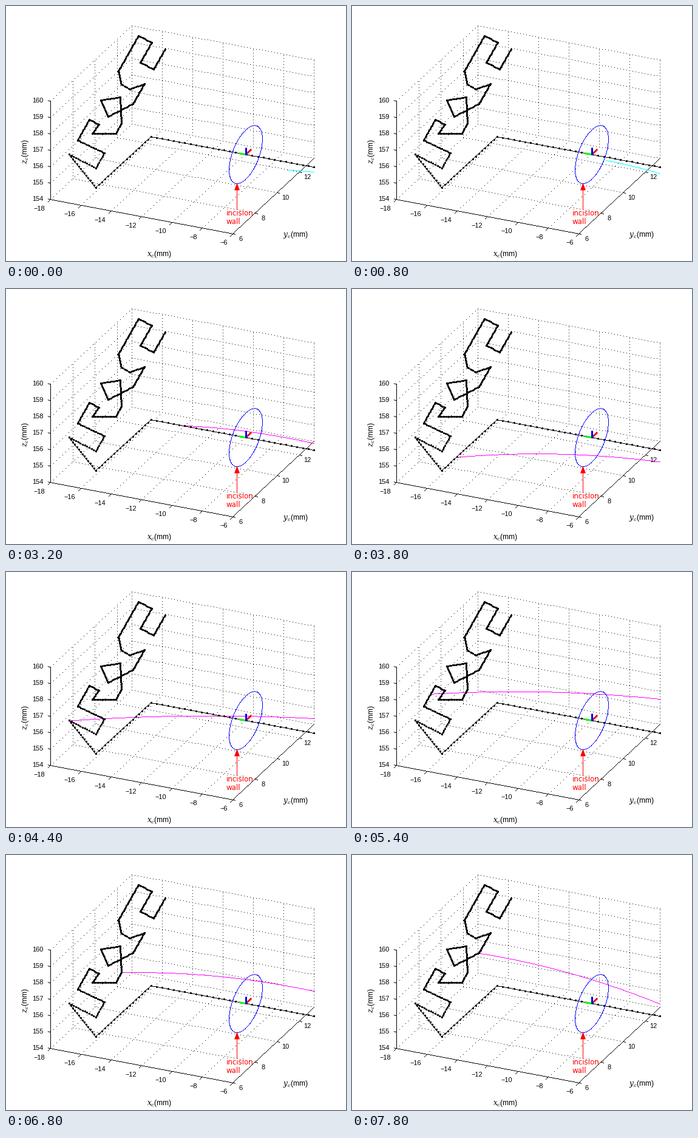
Animation of 560x420 px, one loop 8000 ms. Source, as a matplotlib script:

```python
import numpy as np
import matplotlib.pyplot as plt
from matplotlib.animation import FuncAnimation
from matplotlib.collections import LineCollection

plt.rcParams["font.family"] = "Liberation Sans"
plt.rcParams["mathtext.fontset"] = "dejavuserif"

DPI, W, H = 100, 560, 420
PX = 72 / DPI
STEP, FRAMES = 200, 40

# Orthographic view: screen vectors for one unit along each axis
EX = np.array([25, 4.7])
EY = np.array([18.27, -16.95])
EZ = np.array([0, -27])
ORIGIN = np.array([73, 318.3])
X0, X1, Y0, Y1, Z0, Z1 = -18, -6, 6, 13.334, 154, 160


def project(x, y, z):
    return ORIGIN + (x - X0) * EX + (y - Y0) * EY + (z - Z0) * EZ


fig = plt.figure(figsize=(W / DPI, H / DPI), dpi=DPI, facecolor="white")
ax = fig.add_axes([0, 0, 1, 1])
ax.set_xlim(-0.5, W - 0.5)
ax.set_ylim(H - 0.5, -0.5)
ax.axis("off")


def raster(pts, every=1):
    """One-pixel dashes along a polyline, without smoothing."""
    dots = []
    for a, b in zip(pts[:-1], pts[1:]):
        n = max(1, int(np.ceil(np.abs(b - a).max())))
        k = np.arange(0, n + 1, every)[:, None] / n
        dots.append(np.rint(a + (b - a) * k))
    dots = np.unique(np.vstack(dots), axis=0)
    half = np.array([0.5, 0])
    return np.stack([dots - half, dots + half], axis=1)


def line(pts, color="black", zorder=2, every=1):
    segs = raster(np.asarray(pts, dtype=float), every)
    art = LineCollection(segs, colors=color, linewidths=PX,
                         zorder=zorder, snap=False)
    return ax.add_collection(art, autolim=False)


def label(x, y, text, size=11, **kw):
    kw = {"ha": "center", "va": "center", **kw}
    ax.text(x, y, text, fontsize=size * PX, **kw)


def grid(*corners):
    line([project(*c) for c in corners], zorder=1, every=5)


def draw_axes():
    for x in range(X0, X1 + 1, 2):
        grid((x, Y0, Z0), (x, Y1, Z0), (x, Y1, Z1))
        tick = project(x, Y0, Z0)
        line([tick, tick + (-4, 4)])
        label(tick[0] - 9, tick[1] + 15, f"\u2212{-x}", ha="right")
    for y in (6, 8, 10, 12):
        grid((X1, y, Z0), (X0, y, Z0), (X0, y, Z1))
        tick = project(X1, y, Z0)
        line([tick, tick + (4, 1)])
        label(tick[0] + 13.5, tick[1] + 8.5, str(y))
    for z in range(Z0, Z1 + 1):
        grid((X0, Y0, z), (X0, Y1, z), (X1, Y1, z))
        tick = project(X0, Y0, z)
        line([tick, tick + (-4, -1)])
        label(61, tick[1] - 0.5, str(z), ha="right")
    grid((X1, Y1, Z0), (X1, Y1, Z1))
    line([project(X0, Y0, Z1), project(X0, Y0, Z0),
          project(X1, Y0, Z0), project(X1, Y1, Z0)])
    label(252, 409, "$x_c$(mm)", 12)
    label(476, 377, "$y_c$(mm)", 12)
    label(31, 239, "$z_c$(mm)", 12, rotation=90)


# Corners of the planned tip path
PATH = np.array([
    (506, 265), (238, 215), (147, 299), (103, 244), (147, 267), (161, 242),
    (117, 221), (136, 187), (152, 195), (141, 210), (180, 210), (189, 193),
    (187, 150), (155, 155), (167, 182), (208, 161), (227, 128), (203, 137),
    (189, 129), (184, 107), (217, 49), (239, 60), (220, 93), (242, 104),
    (261, 71)], dtype=float)
LENGTHS = np.hypot(*np.diff(PATH, axis=0).T)
ARC = np.concatenate([[0], np.cumsum(LENGTHS)])


def draw_path():
    line(PATH, zorder=4)
    for k, (a, b) in enumerate(zip(PATH[:-1], PATH[1:])):
        gap = 2.5 + 7 * np.exp(-k / 2)  # samples get denser along the way
        n = round(LENGTHS[k] / gap)
        dots = np.rint(a + (b - a) * np.linspace(0, 1, n + 1)[:, None])
        ax.plot(dots[:, 0], dots[:, 1], "o", color="black",
                ms=3.2 * PX, mew=0, zorder=4)


def draw_port():
    center = np.array([394.5, 244.2])
    a = np.linspace(0, 2 * np.pi, 91)[:, None]
    line(center + 1.5 * (np.cos(a) * EY + np.sin(a) * EZ), "blue", zorder=5)
    for vec, color in ((-0.45 * EX, "lime"), (0.5 * EY, "#ee1111"),
                       (0.45 * EZ, "#0000ee")):
        tip = center + vec
        ax.plot([center[0], tip[0]], [center[1], tip[1]], color=color,
                lw=3 * PX, zorder=6, solid_capstyle="butt")
    line([(380, 335), (380, 300)], "red", zorder=6)
    ax.fill([380, 375.5, 384.5], [291, 303, 303], color="red", lw=0, zorder=6)
    for y, word in ((345, "incision"), (359, "wall")):
        label(362, y, word, 11.7, ha="left", va="baseline", color="red",
              family="DejaVu Sans")


EDGE = 507
# Key moments: time, distance along the path, height at the right edge
KEYS = np.array([
    (2600, 98, 262), (3200, 221, 254), (3600, 330, 299), (4400, 466, 241),
    (5000, 594, 222), (5400, 617, 209), (6800, 727, 224), (7800, 878, 245)])


def settling(t):
    """The solver overshoots once, then settles beside the path."""
    fade, s = np.exp(-t / 400), t / STEP
    end = 260 + 13 * fade + 70 * s * np.exp(1 - s)
    return 411 + 52 * fade, 251.5 + 18.5 * fade, end, 6e-4


def tracking(t):
    dist, end = (np.interp(t, KEYS[:, 0], col) for col in KEYS[:, 1:].T)
    tx, ty = (np.interp(dist, ARC, col) for col in PATH.T)
    bow = min(1.5 + 0.026 * (tx - 103), 4.1) * 1e-4
    return tx, ty, end, bow


def update(i):
    t = i * STEP
    early = t < KEYS[0, 0]
    tx, ty, end, bow = settling(t) if early else tracking(t)
    x = np.linspace(tx, EDGE, 40)
    y = ty + (end - ty) * (x - tx) / (EDGE - tx) + bow * (x - tx) * (x - EDGE)
    needle.set_segments(raster(np.column_stack([x, y])))
    needle.set_color("cyan" if early else "magenta")
    return [needle]


draw_axes()
draw_path()
draw_port()
needle = line([(463, 270), (EDGE, 273)], "cyan", zorder=3)
anim = FuncAnimation(fig, update, frames=FRAMES, interval=STEP,
                     repeat=True, repeat_delay=0, blit=False)
plt.show()
```
